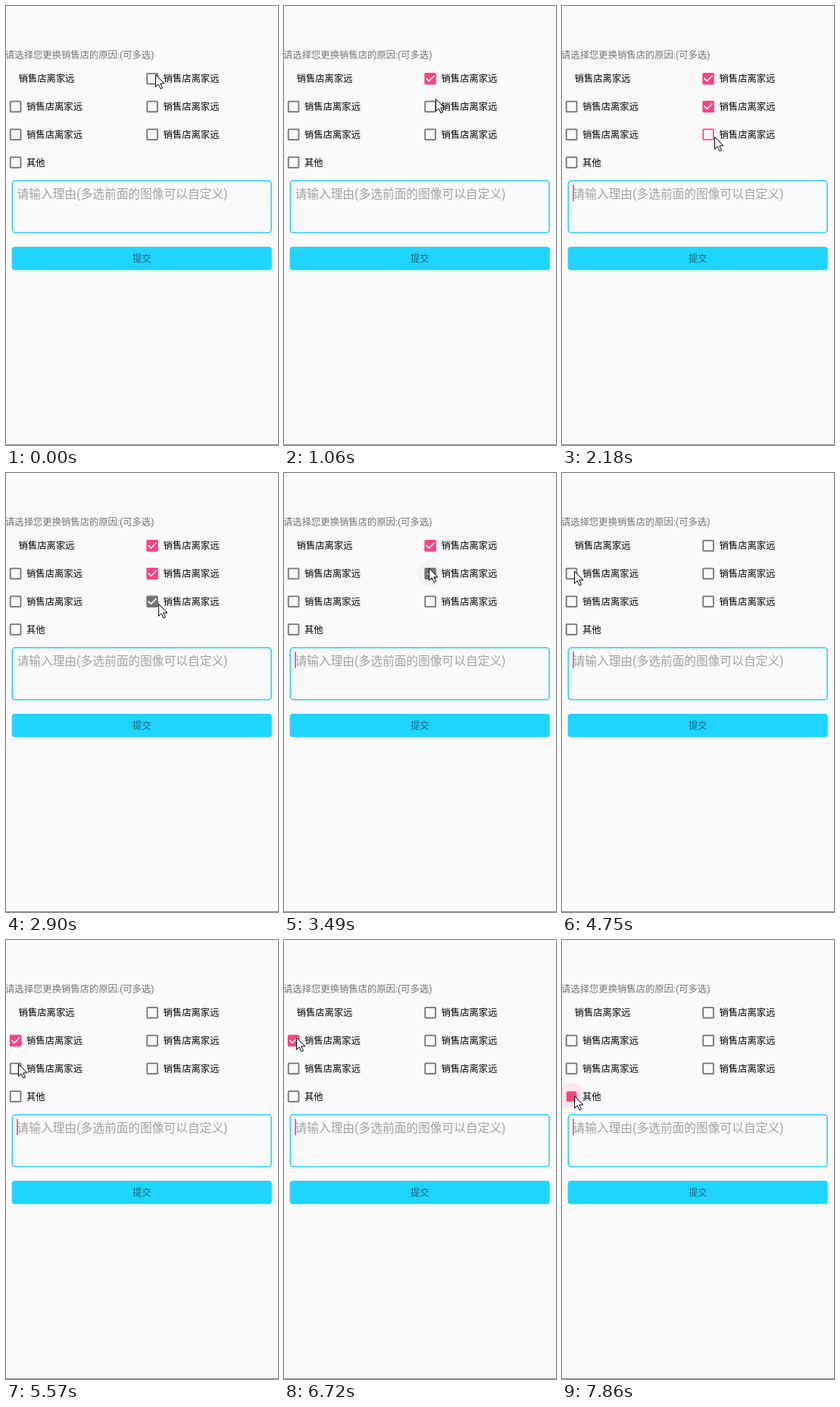
An HTML page with a canvas for the animation above (8 s loop, 359 by 578 pixels).

```html
<!DOCTYPE html>
<html lang="zh-CN">
<head>
<meta charset="utf-8">
<style>
html, body { margin: 0; width: 100%; height: 100%; overflow: hidden; background: #fafafa; }
canvas { display: block; }
</style>
</head>
<body>
<canvas id="stage" width="359" height="578"></canvas>
<script>
const ctx = document.getElementById('stage').getContext('2d');
const LOOP = 8000;
const PAPER = '#fafafa', PINK = '#ff4081', GREY = '#737373', CYAN = '#1ed5ff';
const REASON = '销售店离家远';
const COLUMN_X = [12.6, 193.1], FIRST_ROW = 95.7, ROW_STEP = 36.75;

// Pointer tip at each click; the click toggles the nearest box.
const clicks = [
  [520, 197, 90], [1610, 201, 130], [2180, 201, 172], [2900, 201, 172], [3430, 191, 125],
  [4000, 197, 94], [5150, 16, 129], [5700, 16, 163], [6300, 16, 163], [6740, 16, 128], [7740, 16, 205]
].map(([time, x, y]) => ({
  time, x, y,
  column: x > 100 ? 1 : 0,
  row: Math.round((y - FIRST_ROW) / ROW_STEP)
}));

const ramp = (value, start, length) => Math.min(1, Math.max(0, (value - start) / length));
const mix = (a, b, k) => a + (b - a) * k;

function text(string, x, baseline, color, size = 12.33) {
  ctx.font = `${size}px Roboto, "Noto Sans CJK SC", "Noto Sans CJK", sans-serif`;
  ctx.fillStyle = color;
  ctx.fillText(string, x, Math.round(baseline));
}

function roundRect(x, y, w, h, r) {
  ctx.beginPath();
  ctx.roundRect(x, y, w, h, r);
}

function drawRipple(elapsed, color) {
  const strength = ramp(elapsed, -60, 180) ** 2 * (1 - ramp(elapsed, 260, 150));
  ctx.globalAlpha = 0.11 * strength;
  ctx.fillStyle = color;
  ctx.beginPath();
  ctx.arc(0, 0, 17.5, 0, Math.PI * 2);
  ctx.fill();
  ctx.globalAlpha = 1;
}

function drawTick(scale) {
  ctx.scale(0.86 * scale, 0.86 * scale);
  ctx.strokeStyle = PAPER;
  ctx.lineWidth = 2;
  ctx.beginPath();
  ctx.moveTo(-6.3, -0.7);
  ctx.lineTo(-2, 3.6);
  ctx.lineTo(6.3, -4.7);
  ctx.stroke();
}

function drawCheckbox(column, row, t) {
  const own = clicks.filter(click => click.column === column && click.row === row);
  const past = own.filter(click => click.time <= t);
  const upcoming = own[past.length];
  const checked = past.length % 2 === 1;
  const color = checked ? PINK : GREY;
  const elapsed = past.length ? t - past[past.length - 1].time : Infinity;

  // The square squeezes a little around the moment it is completely filled.
  const squeeze = 1 - ramp(Math.abs(elapsed - (checked ? 130 : 230)), 0, 150);
  const hole = checked ? 1 - ramp(elapsed, 60, 60) : ramp(elapsed, 220, 150);
  const tick = checked ? ramp(elapsed, 150, 200) : 1 - ramp(elapsed, 0, 200);
  const size = 15.5 - 2 * squeeze;
  const inner = 11.9 * hole;
  const x = COLUMN_X[column], y = FIRST_ROW + row * ROW_STEP;

  ctx.save();
  ctx.translate(x, y);
  drawRipple(elapsed, color);
  if (upcoming) drawRipple(t - upcoming.time, color);
  ctx.fillStyle = color;
  roundRect(-size / 2, -size / 2, size, size, 1.7);
  ctx.fill();
  ctx.fillStyle = PAPER;
  ctx.fillRect(-inner / 2, -inner / 2, inner, inner);
  if (tick) drawTick(tick);
  ctx.restore();
}

function drawChoices(t) {
  for (let row = 0; row < 4; row++) {
    for (let column = 0; column < 2; column++) {
      if (row === 3 && column === 1) continue;
      const plain = row === 0 && column === 0;
      if (!plain) drawCheckbox(column, row, t);
      text(row === 3 ? '其他' : REASON, COLUMN_X[column] + (plain ? 4 : 14.4),
        FIRST_ROW + row * ROW_STEP + 4.6, '#000');
    }
  }
}

function drawPointer(t) {
  const index = clicks.findIndex(click => click.time > t);
  const to = clicks.at(index);
  const from = index > 0 ? clicks[index - 1] : index < 0 ? to : clicks[0];
  const k = from === to ? 0 : ramp(t, from.time + 190, (to.time - from.time) * 0.4);
  ctx.save();
  ctx.translate(Math.round(mix(from.x, to.x, k)) + 0.5, Math.round(mix(from.y, to.y, k)) + 0.5);
  const outline = new Path2D('M0 0V16L3.7 12.5L6.5 18.5L9 17.4L6.3 11.5H11.5Z');
  ctx.fillStyle = '#fff';
  ctx.strokeStyle = '#000';
  ctx.lineWidth = 1;
  ctx.fill(outline);
  ctx.stroke(outline);
  ctx.restore();
}

function drawInput(t) {
  ctx.strokeStyle = '#1fd0ee';
  ctx.lineWidth = 1.5;
  roundRect(8.3, 230, 341.8, 68.4, 4);
  ctx.stroke();
  text('请输入理由(多选前面的图像可以自定义)', 14.5, 253, '#a0a0a0', 15.72);
  const blink = t - 120;
  if (blink >= 0 && blink % 1030 < 550) {
    ctx.fillStyle = PINK;
    ctx.fillRect(14.2, 235.5, 1.7, 21.5);
  }
}

function drawButton() {
  ctx.fillStyle = CYAN;
  roundRect(7.6, 316.9, 343.2, 30.8, 4);
  ctx.fill();
  text('提交', 167, 336.7, '#146478');
}

function frame() {
  const t = performance.now() % LOOP;
  ctx.fillStyle = PAPER;
  ctx.fillRect(0, 0, 359, 578);
  text('请选择您更换销售店的原因:(可多选)', -1, 69, GREY);
  drawChoices(t);
  drawInput(t);
  drawButton();
  ctx.fillStyle = '#8c8c8c';
  ctx.fillRect(0, 577, 359, 1);
  drawPointer(t);
  requestAnimationFrame(frame);
}
frame();
</script>
</body>
</html>
```
